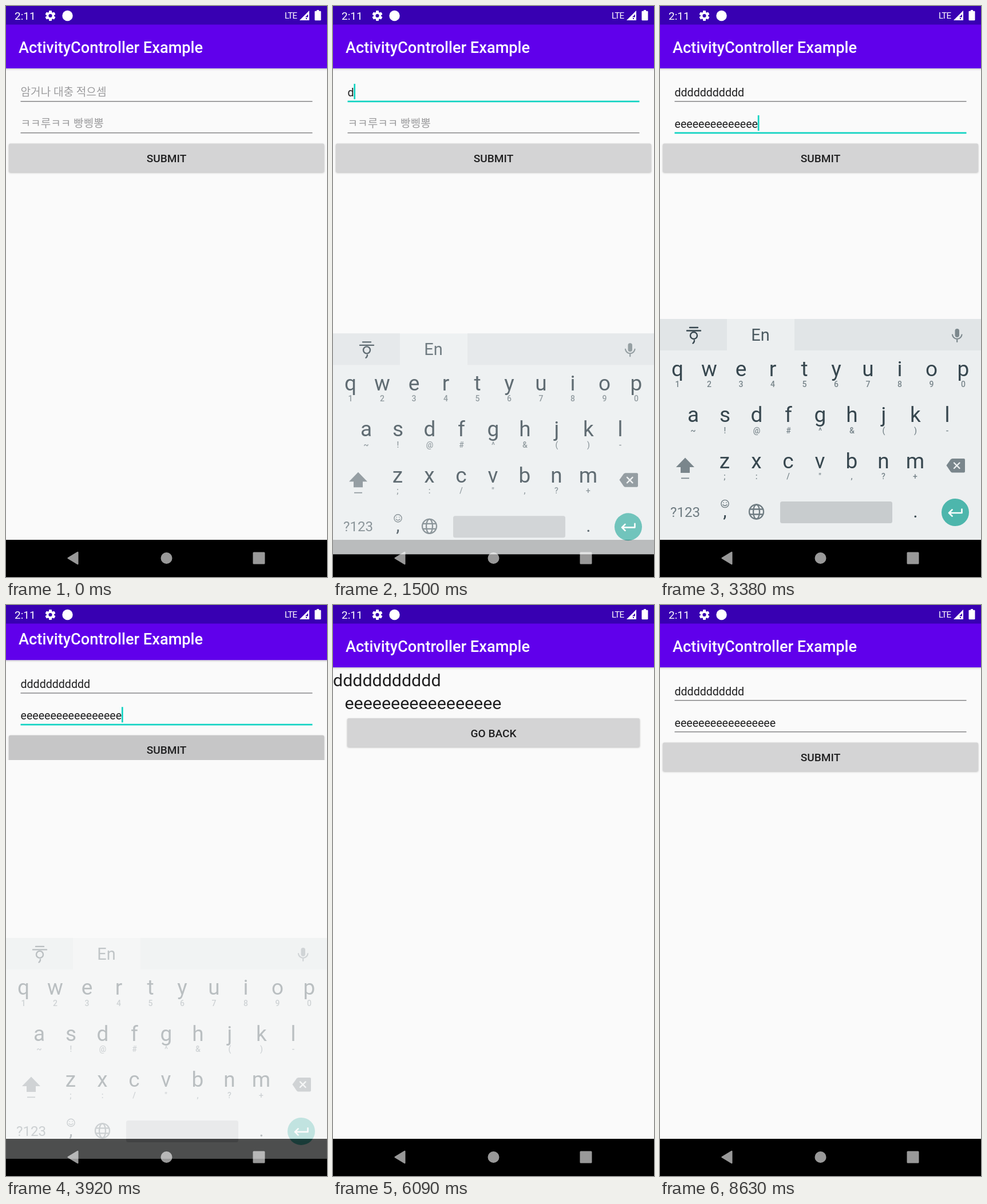
An HTML page for the animation above (8.67 s loop, 561x998 px).

```html
<!DOCTYPE html>
<html lang="ko">
<head>
<meta charset="utf-8">
<title>Form demo</title>
<style>
  html, body { margin: 0; width: 100%; height: 100%; overflow: hidden; background: #fafafa; }
  svg { display: block; width: 100vw; height: 100vh; }
  text { font-family: Roboto, 'Noto Sans CJK KR', 'Noto Sans CJK JP', sans-serif; white-space: pre; }
  .mid { text-anchor: middle; }
  .med { font-weight: 500; }
  .ink { fill: #1f1f20; }
  .hint { font-size: 19.1px; fill: #9c9c9e; }
  .typed { font-size: 19.6px; }
  .shown { font-size: 30.4px; }
  .btn { fill: #d4d4d5; filter: drop-shadow(0 1.5px 1.5px rgba(0,0,0,.26)); }
  .key { font-size: 37px; fill: #37474f; }
  .sub { font-size: 14px; font-weight: 500; fill: #78858b; }
  .line { fill: none; stroke-linecap: round; stroke-linejoin: round; }
</style>
</head>
<body>
<svg id="stage" viewBox="0 0 561 998" preserveAspectRatio="none"></svg>
<script>
const LOOP = 8670;
const TEAL = '#10d3c2';
const FOCUS_1 = 1170, FOCUS_2 = 2500, OPEN = 3820, CLOSE = 6100;

const clamp = v => Math.max(0, Math.min(1, v));
const span = (t, a, b) => clamp((t - a) / (b - a));
const easeOut = p => 1 - (1 - p) ** 2;
const rect = (x, y, w, h, extra = '') => `<rect x="${x}" y="${y}" width="${w}" height="${h}" ${extra}/>`;
const text = (x, y, s, cls = '', extra = '') => `<text x="${x}" y="${y}" class="${cls}" ${extra}>${s}</text>`;

const appBar = () => rect(0, 109, 561, 4, 'fill="url(#shade)"') +
  rect(0, 32, 561, 77, 'fill="#6000eb"') +
  text(22, 81.5, 'ActivityController Example', 'med', 'font-size="27.2" fill="#fff"');

const field = (n, y, hint) =>
  text(25.5, y + 7, hint, 'hint', `id="hint${n}"`) +
  text(25.5, y + 7.5, '', 'ink typed', `id="typed${n}"`) +
  rect(25.5, y + 16, 510, 1.4, `id="rule${n}"`) +
  rect(0, y - 14, 2.7, 27, `id="caret${n}" fill="${TEAL}"`);

const button = (x, y, w, label, id) =>
  rect(x, y, w, 50, 'rx="2.5" class="btn"') +
  rect(x, y, w, 50, `rx="2.5" id="${id}" opacity="0"`) +
  text(280.5, y + 32.5, label, 'ink med mid', 'font-size="19.1"');

const page = body => rect(0, 0, 561, 970, 'fill="#fafafa"') + appBar() + body;

function gear(cx, cy) {
  let teeth = '';
  for (let a = 0; a < 360; a += 60)
    teeth += rect(cx - 2.5, cy - 9, 5, 5, `rx="1" transform="rotate(${a} ${cx} ${cy})"`);
  return `<g fill="#fff">${teeth}</g>
    <circle cx="${cx}" cy="${cy}" r="4.9" fill="none" stroke="#fff" stroke-width="3.6"/>`;
}

const statusBar = () => rect(0, 0, 561, 32.5, 'fill="#3800b2"') +
  text(15, 24, '2:11', '', 'font-size="19.1" fill="#fff"') +
  gear(77.5, 17) +
  '<circle cx="107.5" cy="17" r="9.2" fill="#fff"/>' +
  text(487, 22, 'LTE', '', 'font-size="15.2" letter-spacing="-.9" fill="#fff"') +
  `<path d="M513 25H530V8Z" fill="#fff"/>
   <path d="M523 19.5L528 14.5V19.5ZM524 21H526V23H524Z" fill="#3800b2"/>
   <path d="M543 7h4v1.8h2.2q1.3 0 1.3 1.3V24q0 1.3-1.3 1.3h-8.4q-1.3 0-1.3-1.3V10.100q0-1.300 1.300-1.300H543Z" fill="#fff"/>`;

function keyRow(letters, subs, x, y) {
  return [...letters].map((c, i) => {
    const cx = x + i * 55.5;
    return text(cx, y, c, 'key mid') + text(cx, y + 19.5, subs[i].replace('&', '&amp;'), 'sub mid');
  }).join('');
}

const keyboard = () => `
  ${rect(0, 547, 561, 386, 'fill="#eceff0"')}
  ${rect(0, 547, 117, 55, 'fill="#e1e5e7"')}
  ${rect(235, 547, 326, 55, 'fill="#e1e5e7"')}
  <g class="line" stroke="#37474f" stroke-width="2.4">
    <path d="M52 562H66M47 567.500H71M60 584.500Q60 588 57.500 589.500"/>
    <circle cx="59" cy="576" r="6"/>
  </g>
  ${text(175.5, 585, 'En', 'mid', 'font-size="29" fill="#4b5a61"')}
  ${rect(515.5, 564, 7.5, 15, 'rx="3.75" fill="#7c888d"')}
  <path class="line" d="M511 574.500a8.300 8.300 0 0 0 16.500 0M519.200 583v4" stroke="#7c888d" stroke-width="2.2"/>
  ${keyRow('qwertyuiop', '1234567890', 30.5, 646.5)}
  ${keyRow('asdfghjkl', '~!@#^&()-', 58, 727)}
  ${keyRow('zxcvbnm', ';:/",?+', 113, 807.5)}
  <g fill="#7a868c">
    <path d="M44 789.500L60 806H52V816H36V806H28Z"/>
    ${rect(37, 824.5, 14, 1.8)}
    <path d="M500.500 803L508 792.500Q509.500 791 511 791H531Q533 791 533 793V813.500Q533 815.500 531 815.500H511Q509.500 815.500 508 814Z"/>
  </g>
  <path class="line" d="M514 798.500L523.500 808M523.500 798.500L514 808" stroke="#eceff0" stroke-width="2.4"/>
  ${text(18, 893, '?123', '', 'font-size="24.2" fill="#6f7c82"')}
  <g class="line" stroke="#6f7c82" stroke-width="1.400">
    <circle cx="113.500" cy="870" r="6.600"/>
    <path d="M110 871.500q3.500 4 7 0M111 867.800v.4M116 867.800v.4"/>
  </g>
  ${text(113.5, 893, ',', 'mid', 'font-size="32" fill="#37474f"')}
  <g class="line" stroke="#6f7c82" stroke-width="2.300">
    <circle cx="168.500" cy="884" r="12.500"/>
    <ellipse cx="168.500" cy="884" rx="5.500" ry="12.500"/>
    <path d="M157.500 879.500H179.500M157.500 888.500H179.500"/>
  </g>
  ${rect(210, 866, 196, 38, 'rx="3.5" fill="#c8ccce"')}
  ${text(446.5, 894, '.', 'mid', 'font-size="32" fill="#37474f"')}
  <circle cx="516" cy="885" r="24" fill="#4db6ac"/>
  <path class="line" d="M527.500 879.500V886H505M510.500 880.500L505 886L510.500 891.500" stroke="#fff" stroke-width="2.600"/>`;

const navIcons = () => `<g fill="#fff" stroke="none" opacity=".6">
  <path d="M108 964Q106.500 965 108 966L124.500 976Q126.500 977 126.500 975V955Q126.500 953 124.500 954Z"/>
  <circle cx="280.500" cy="965" r="10"/>
  ${rect(431.5, 954.5, 21, 21, 'rx="1.5"')}</g>`;

const stage = document.getElementById('stage');
stage.innerHTML = `
  <defs>
    <linearGradient id="shade" x2="0" y2="1">
      <stop stop-color="#000" stop-opacity=".16"/><stop offset="1" stop-color="#000" stop-opacity="0"/>
    </linearGradient>
    <clipPath id="reveal">${rect(0, 0, 561, 998, 'id="revealBox"')}</clipPath>
  </defs>
  <g id="form">${page(
    field(1, 150, '암거나 대충 적으셈') + field(2, 205, 'ㅋㅋ루ㅋㅋ 빵삥뽕') +
    button(5, 240.5, 551, 'SUBMIT', 'press1'))}</g>
  <g id="result" clip-path="url(#reveal)"><g id="slide">${page(
    text(0, 141.5, 'd'.repeat(11), 'ink shown') + text(20.5, 182, 'e'.repeat(17), 'ink shown') +
    button(25, 198, 511, 'GO BACK', 'press2'))}</g></g>
  ${statusBar()}
  ${rect(0, 933, 561, 65)}
  <g id="keys">${keyboard()}</g>
  ${navIcons()}`;

const el = {};
stage.querySelectorAll('[id]').forEach(n => el[n.id] = n);
const set = (id, attrs) => { for (const k in attrs) el[id].setAttribute(k, attrs[k]); };
const show = (id, on) => { el[id].style.display = on ? '' : 'none'; };

// Held key: one letter, a pause, then steady repeats.
const held = (t, first, repeat, gap, max) =>
  t < first ? 0 : t < repeat ? 1 : Math.min(max, 2 + Math.floor((t - repeat) / gap));

function drawField(n, y, letter, count, focused) {
  const typed = el['typed' + n];
  typed.textContent = letter.repeat(count);
  show('hint' + n, !count);
  set('rule' + n, focused
    ? { y: y + 15.5, height: 2.7, fill: TEAL }
    : { y: y + 16, height: 1.4, fill: '#7e7e80' });
  show('caret' + n, focused);
  if (focused) set('caret' + n, { x: 25.3 + (count ? typed.getComputedTextLength() : 0) });
}

function drawKeyboard(t) {
  const up = span(t, 1420, 1610), down = span(t, OPEN, OPEN + 150);
  show('keys', up > 0 && down < 1);
  const shift = 77 * (1 - up) ** 2 + 77 * down ** 2;
  set('keys', {
    transform: `translate(0 ${shift.toFixed(2)})`,
    opacity: Math.min(1, up * 1.85) * (1 - down)
  });
}

function drawResult(t) {
  const open = easeOut(easeOut(span(t, OPEN, 4200)));
  const close = span(t, CLOSE, 6210);
  show('result', open > 0 && close < 1);
  set('revealBox', { y: 933 * (1 - open) });
  set('slide', { transform: `translate(0 ${(38 * (1 - open)).toFixed(2)})` });
  set('form', { transform: `translate(0 ${t < CLOSE ? (-18 * open).toFixed(2) : 0})` });
  set('result', { opacity: 1 - close });

  const left = t < 5130 ? 216 : 25;
  const glow = t < 5085 || t >= 5670 ? 0 : 1 - 0.9 * span(t, 5210, 5420);
  set('press2', { x: left, width: 536 - left, opacity: 0.07 * glow });
}

function draw(t) {
  drawField(1, 150, 'd', held(t, 1480, 1930, 40, 11), t >= FOCUS_1 && t < FOCUS_2);
  drawField(2, 205, 'e', held(t, 2620, 2955, 35, 17), t >= FOCUS_2 && t < CLOSE - 1000);
  set('press1', { opacity: 0.07 * span(t, 3720, 3790) * (1 - span(t, 3900, 4200)) });
  drawKeyboard(t);
  drawResult(t);
}

function tick() {
  draw(performance.now() % LOOP);
  requestAnimationFrame(tick);
}
tick();
</script>
</body>
</html>
```
